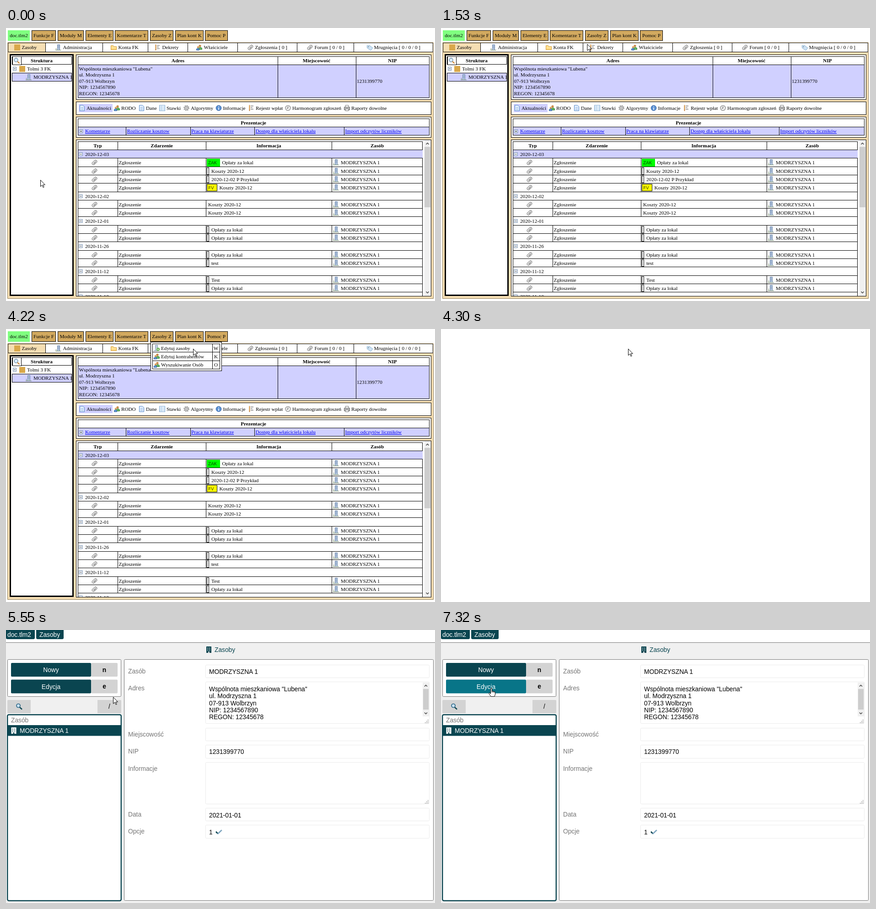
An HTML page for the animation above (8 s loop, 938 by 597 pixels).

```html
<!DOCTYPE html>
<html lang="pl">
<head>
<meta charset="utf-8">
<title>Zasoby</title>
<style>
html, body { margin: 0; width: 100%; height: 100%; overflow: hidden; background: #fff; }
svg { display: block; }
text { white-space: pre; }
#old { font: 11.2px "Liberation Serif", "Times New Roman", serif; }
#form { font: 13.75px "Liberation Sans", Arial, sans-serif; }
</style>
</head>
<body>
<svg id="stage" width="938" height="597" viewBox="0 0 938 597">
  <g id="old"></g>
  <g id="form"></g>
  <path id="arrow" fill="#fff" stroke="#000" d="M.5.5v14.2l3.3-3.1 2.4 5.2 2-.9-2.3-5h4.5z"/>
  <g id="hand" stroke="#000" stroke-linejoin="round">
    <path fill="#fff" d="M-1.3 1.3a1.3 1.3 0 0 1 2.6 0v6q1.4-1.2 2.7.3 1.3-.8 2.3.5 2-.6 2.2 1.4v4.5l-1.6 4.5h-7.6l-4-5.5q-1.3-2.2.2-2.6 1.3-.2 3 2z"/>
    <path fill="none" stroke-width=".8" d="M1.3 7v3M4 7.6v2.6M6.4 8.2v2.2"/>
  </g>
</svg>
<script>
const $ = id => document.getElementById(id);
const LOOP = 8000, LILAC = '#d0d0ff', WHEAT = '#f5deb3', TEAL = '#0a4550', HOVER = '#087588';
const USER = 'doc.tlm2', PLACE = 'MODRZYSZNA 1', TAX = '1231399770';
const ADDRESS = ['Wspólnota mieszkaniowa "Lubena"', 'ul. Modrzyszna 1', '07-913 Wolbrzyn',
  'NIP: 1234567890', 'REGON: 12345678'];

// drawing helpers
const fill = (x, y, w, h, c, more = '') => `<rect x="${x}" y="${y}" width="${w}" height="${h}" fill="${c}" ${more}/>`;
const box = (x, y, x2, y2, c = '#fff', line = '#000', more = '') =>
  fill(x + .5, y + .5, x2 - x - 1, y2 - y - 1, c, `stroke="${line}" ${more}`);
const path = (d, line = '#000', w = 1, c = 'none') => `<path d="${d}" fill="${c}" stroke="${line}" stroke-width="${w}"/>`;
const hline = (x, x2, y) => path(`M${x} ${Math.floor(y) + .5}H${x2}`);
const vline = (x, y, y2) => path(`M${x + .5} ${y}V${y2}`);
const text = (x, y, s, more = '') => `<text x="${x}" y="${y}" ${more}>${s}</text>`;
const mid = 'text-anchor="middle"';
const bold = mid + ' font-weight="bold"';
const chevron = (x, y, dir) => path(`M${x - 3} ${y + 1.5 * dir}l3 ${-3 * dir} 3 ${3 * dir}`, '#444', 1.5);

const glyphs = {
  square: fill(0, 0, 13, 13, '#d9a84a'),
  house: fill(4, 0, 6, 12, '#b9cbe2') + path('M4.5 12V.5h5V12M6 3h2M6 5.5h2M6 8h2', '#6580a8') + path('M1.5 12V8M0 12.5h13', '#78906e'),
  add: fill(3, 0, 6, 12, '#dde6ef') + path('M3.5 12V.5h5V12M5 3h2M5 5.5h2M0 12.5h9', '#7089a8') +
    '<circle cx="9.5" cy="9.5" r="3.5" fill="#55a83c"/>' + path('M7.5 9.5h4M9.5 7.5v4', '#fff'),
  folder: path('M.5 11.5v-9h5l1 2h6v7z', '#d49a32', 1, '#ffdc86') + path('M1 6h11', '#fff0bd'),
  people: '<circle cx="8" cy="3" r="2.6" fill="#c98b4c"/><circle cx="4" cy="6" r="2.3" fill="#dca05e"/>' +
    path('M5.5 11V8q3-4 7 0v3z', '#3a8a45', 1, '#65b35f') + path('M.5 12.5V10q3-4 6 0v2.5z', '#315f9f', 1, '#6297d2'),
  clip: '<g transform="rotate(-42 6.5 6.5)" fill="none" stroke="#858585"><rect x=".5" y="3.5" width="12" height="6" rx="2.5" fill="#eee"/><path d="M3 6.5h8M3 8h6"/></g>',
  tag: '<g transform="rotate(35 6.5 6.5)"><path d="M0 6.5 3 3h10v7H3z" fill="#cfe3f4" stroke="#92b8d6"/><circle cx="4" cy="6.5" r="1" fill="#567"/></g>',
  doc: path('M1.5.5h7l3 3v9h-10z', '#4d83c7', 1, '#e9f2ff') + path('M3.5 5h6M3.5 7.5h6M3.5 10h6', '#92b6e1'),
  grid: fill(.5, .5, 12, 12, '#edf6ff', 'stroke="#7da6cf"') + path('M1 4h11M1 7h11M1 10h11M4.5 1v11', '#b2cfe8'),
  list: path('M2.5 0v13', '#c07b35', 2) + path('M5 2h6M5 5.5h4M5 9h6', '#555') + path('M1 2h3M1 5h3M1 8h3', '#f1c77c'),
  gear: '<circle cx="6.5" cy="6.5" r="4" fill="#ddd" stroke="#888"/><circle cx="6.5" cy="6.5" r="5.3" fill="none" stroke="#888" stroke-width="2" stroke-dasharray="2 2.15"/><circle cx="6.5" cy="6.5" r="1.6" fill="#fff" stroke="#888"/>',
  info: '<circle cx="6.5" cy="6.5" r="5.8" fill="#5c91d3" stroke="#3464a5"/>' + path('M6.5 5.5v5M6.5 2.5v1.6', '#fff', 1.6),
  clock: '<circle cx="6.5" cy="6.5" r="5.5" fill="#eee" stroke="#999" stroke-width="1.5"/>' + path('M6.5 3v4H4', '#555'),
  printer: path('M3 5V.5h7V5', '#777', 1, '#fff') + path('M.5 4.5h12v6H.5z', '#666', 1, '#bbb') + path('M3 8.5h7v4H3z', '#666', 1, '#fff'),
  lens: '<circle cx="5" cy="5" r="4" fill="#dceeff" stroke="#6f8fab" stroke-width="1.4"/>' + path('M8 8l4.5 4.5', '#c98232', 2.2),
  fold: fill(.5, .5, 7, 7, '#fff', 'stroke="#6c87aa"') + path('M2 4h4', '#234'),
  unfold: fill(.5, .5, 7, 7, '#fff', 'stroke="#6c87aa"') + path('M2 4h4M4 2v4', '#234')
};
const icon = (kind, x, y) => `<g transform="translate(${x} ${y})">${glyphs[kind]}</g>`;
const tower = (x, y, c, hole) => fill(x, y, 11, 14, c) +
  path(`M${x + 2.5} ${y + 3.2}h6M${x + 2.5} ${y + 6}h6M${x + 2.5} ${y + 8.8}h6`, hole, 1.6) .replace('/>', ' stroke-dasharray="1.7 2.4"/>') +
  fill(x + 4.3, y + 11, 2.4, 3, hole);

function menuBar() {
  const items = [['Funkcje F', 56, 109], ['Moduły M', 113, 170], ['Elementy E', 174, 235], ['Komentarze T', 238, 311],
    ['Zasoby Z', 315, 366], ['Plan kont K', 370, 432], ['Pomoc P', 435, 485]];
  return fill(4, 5, 48, 23, '#80ff80') + text(28, 20, USER, mid) +
    items.map(([s, a, b]) => box(a, 5, b, 28, '#d2a95f') + text((a + b) / 2, 20, s, mid)).join('');
}

function tabs() {
  const items = [['Zasoby', 4, 'square', 18], ['Administracja', 86, 'house', 108], ['Konta FK', 211, 'folder', 229],
    ['Dekrety', 310, 'list', 325], ['Właściciele', 397, 'people', 416], ['Zgłoszenia [ 0 ]', 506, 'clip', 528],
    ['Forum [ 0 / 0 ]', 636, 'clip', 658], ['Mrugnięcia [ 0 / 0 / 0 ]', 760, 'tag', 788]];
  return items.map(([s, x, kind, ix], i) =>
    box(x, 32, (items[i + 1] || [0, 933])[1] + 1, 53, i ? '#fff' : WHEAT) + icon(kind, ix, 36) + text(ix + 16.5, 46, s)).join('');
}

function tree() {
  return fill(9.5, 58.5, 137, 526, '#fff', 'stroke="#000" stroke-width="3"') +
    box(13, 62, 144, 80) + text(78, 74.5, 'Struktura', bold) + box(14, 62, 34, 81) + icon('lens', 17, 65) +
    icon('fold', 15, 85) + icon('square', 29, 83) + text(46, 93, 'Tolmi 3 FK') +
    box(13, 98, 144, 117, LILAC) + icon('house', 43, 101) + text(60, 111, PLACE);
}

function addressPanel() {
  return box(153, 58, 930, 157) + box(157, 62, 926, 153) + fill(158, 81, 767, 71, LILAC) + hline(157, 926, 80) +
    vline(594, 62, 153) + vline(765, 62, 153) +
    text(376, 74.5, 'Adres', bold) + text(679, 74.5, 'Miejscowość', bold) + text(845, 74.5, 'NIP', bold) +
    ADDRESS.map((s, i) => text(159.5, 92.5 + 13.5 * i, s)).join('') + text(767, 119.5, TAX);
}

function toolBar() {
  const items = [['Aktualności', 160, 'doc'], ['RODO', 236, 'people'], ['Dane', 290, 'doc'], ['Stawki', 335, 'grid'],
    ['Algorytmy', 388, 'gear'], ['Informacje', 458.5, 'info'], ['Rejestr wpłat', 530, 'list'],
    ['Harmonogram zgłoszeń', 610, 'clock'], ['Raporty dowolne', 739, 'printer']];
  return box(153, 161, 930, 190) + fill(159, 166, 74, 18, LILAC) +
    items.map(([s, x, kind]) => icon(kind, x, 168.5) + text(x + 16, 179, s)).join('');
}

function links() {
  const items = [['Komentarze', 173], ['Rozliczanie kosztow', 264.5], ['Praca na klawiaturze', 405],
    ['Dostęp dla właściciela lokalu', 545.5], ['Import odczytów liczników', 741.5]];
  return box(153, 194, 930, 240) + box(157, 198, 926, 235) + fill(158, 217, 767, 17, LILAC) + hline(157, 926, 216) +
    text(541, 210.5, 'Prezentacje', bold) + icon('unfold', 160, 222) +
    items.map(([s, x], i) => (i ? vline(Math.floor(x - 2), 216, 235) : '') +
      text(x, 229, s, 'fill="#00e" text-decoration="underline"')).join('');
}

// '#' starts a date row, '|' a narrow marker, 'ZAK' and 'FV' a coloured badge
const EVENTS = ['#2020-12-03', 'ZAK Opłaty za lokal', '|Koszty 2020-12', '|2020-12-02 P Przykład', 'FV Koszty 2020-12',
  '#2020-12-02', 'Koszty 2020-12', 'Koszty 2020-12', '#2020-12-01', '|Opłaty za lokal', '|Opłaty za lokal',
  '#2020-11-26', '|Opłaty za lokal', '|test', '#2020-11-12', '|Test', '|Opłaty za lokal', '#2020-11-10'];

function info(s, y) {
  const mono = 'font-family="Liberation Mono, monospace" font-size="10.5"';
  if (s[0] == '|') return box(439, y - 8, 444, y + 8) + text(449, y + 4, s.slice(1));
  if (s.startsWith('ZAK')) return fill(439, y - 8, 29, 17, '#0f0') + text(442, y + 3.5, 'ZAK', mono + ' fill="#064d06"') + text(472.5, y + 4, s.slice(4));
  if (s.startsWith('FV')) return box(439, y - 8, 462, y + 8, '#ff0') + text(442, y + 3.5, 'FV', mono + ' fill="#444400"') + text(466.5, y + 4, s.slice(3));
  return text(442, y + 4, s);
}

function eventRow(s, i) {
  const y = Math.round(276 + 18.3 * i), top = Math.floor(266.5 + 18.3 * i), end = Math.floor(284.8 + 18.3 * i);
  const line = hline(157, 911, end);
  if (s[0] == '#')
    return (i ? '' : fill(158, top + 1, 753, end - top - 1, LILAC)) + icon('fold', 159.5, y - 4) + text(173, y + 4, s.slice(1)) + line;
  return [244, 437, 712].map(x => vline(x, top, end)).join('') + icon('clip', 187, y - 6.5) +
    text(246.5, y + 4, 'Zgłoszenie') + info(s, y) + icon('house', 715, y - 7) + text(732, y + 4, PLACE) + line;
}

function events() {
  const heads = [['Typ', 200.5], ['Zdarzenie', 340.5], ['Informacja', 574.5], ['Zasób', 811.5]];
  return '<clipPath id="cut"><rect x="153" y="244" width="777" height="342"/></clipPath>' +
    box(153, 244, 930, 587) + '<g clip-path="url(#cut)">' + box(157, 248, 911, 620) +
    heads.map(([s, x]) => text(x, 261, s, bold)).join('') +
    [244, 437, 712].map(x => vline(x, 248, 266)).join('') + hline(157, 911, 266) +
    EVENTS.map(eventRow).join('') + '</g>' +
    fill(915, 245, 14, 341, '#f0f0f0') + fill(915, 260, 13, 132, '#cdcdcd') + chevron(921.5, 253, 1) + chevron(921.5, 578, -1);
}

function dropDown() {
  const items = [['Edytuj zasoby', 'W', 'add'], ['Edytuj kontrahentów', 'K', 'people'], ['Wyszukiwanie Osób', 'O', 'people']];
  return '<g id="menu">' + box(316, 28, 472, 92) + box(320, 32, 468, 88) + vline(451, 32, 88) +
    items.map(([s, key, kind], i) => {
      const y = 41.5 + 18.3 * i;
      return icon(kind, 323, y - 6.5) + text(339, y + 4, s) + text(459, y + 4, key, mid) + (i ? hline(320, 468, y - 9) : '');
    }).join('') + '</g>';
}

function formPage() {
  const white = 'fill="#fff"', grey = 'fill="#757575"', tealText = `fill="${TEAL}"`;
  const fields = [['Zasób', 76, 105], ['Adres', 113, 205], ['Miejscowość', 214, 243], ['NIP', 251, 281],
    ['Informacje', 289, 381], ['Data', 389, 418], ['Opcje', 426, 456]];
  const key = (y, name, k, id) => fill(11, y, 175, 30, TEAL, `id="${id}" rx="2"`) + fill(186, y, 58, 30, '#d3d3d3', 'rx="2"') +
    text(98.5, y + 20, name, mid + ' ' + white) + text(215, y + 19.5, k, bold);
  const grip = y => [[0, 6], [3, 6], [6, 6], [3, 3], [6, 3], [6, 0]].map(([a, b]) => fill(916 + a, y + b, 1.4, 1.4, '#777')).join('');
  return fill(0, 0, 938, 597, '#f0f0f0') + fill(0, 0, 938, 27, '#fff') + path('M0 27.5H938', '#777') +
    fill(0, -4, 63, 24, TEAL, 'rx="3"') + fill(66, -4, 60, 24, TEAL, 'rx="3"') +
    text(3, 14.5, USER, white) + text(73, 14.5, 'Zasoby', white) +
    tower(438, 36, TEAL, '#f0f0f0') + text(456, 48, 'Zasoby', tealText) +
    box(3, 64, 252, 146, '#fff', '#777', 'rx="2"') + key(72, 'Nowy', 'n', 'add') + key(108.5, 'Edycja', 'e', 'edit') +
    fill(3, 153, 249, 29, '#d3d3d3', 'rx="2"') + fill(54, 153, 146, 29, '#f0f0f0') +
    '<circle cx="27" cy="165.5" r="4" fill="#c9e2f4" stroke="#2d6786" stroke-width="1.7"/>' + path('M30 169l5 4.5', TEAL, 2.4) +
    text(226, 172, '/', mid) +
    fill(3.2, 185.2, 248.6, 406.8, '#fff', `stroke="${TEAL}" stroke-width="2.4" rx="3"`) +
    text(11, 202, 'Zasób', grey) + fill(4, 208, 247, 23.5, TEAL) + tower(11.5, 213, '#fff', TEAL) + text(30, 225, PLACE, white) +
    box(258, 64, 935, 592, '#fff', '#777', 'rx="2"') +
    fields.map(([s, a, b]) => text(267, a + 19, s, grey) + box(436, a, 926, b, '#fff', '#ebebeb', 'rx="2"')).join('') +
    text(444, 96, PLACE) + ADDRESS.map((s, i) => text(444, 134 + 15.35 * i, s)).join('') +
    text(444, 270.5, TAX) + text(444, 409.5, '2021-01-01') + text(444, 447, '1') +
    path('M459 441l4.5 4.5', TEAL, 2.8) + path('M462.7 446l9-8.5', '#7fa6c0', 2.8) +
    fill(911, 115, 14, 74, '#f0f0f0') + fill(912, 129, 12, 45, '#cdcdcd') + chevron(918, 122, 1) + chevron(918, 182, -1) +
    grip(196) + grip(372);
}

$('old').innerHTML = fill(3, 31, 932, 561, WHEAT) + path('M3.5 53V591.5H934.5V53', '#8c7a55') +
  menuBar() + tabs() + tree() + addressPanel() + toolBar() + links() + events() + dropDown();
$('form').innerHTML = formPage();

// pointer moves: first and last change, number of changes, eased or not, evenly timed points
const MOVES = [
  [530, 1300, 11, 1, [[75, 332], [311, 48]]],
  [1380, 2070, 10, 0, [[311, 48], [325, 26], [331, 11], [332, 22]]],
  [2680, 3450, 11, 1, [[332, 22], [406, 42]]],
  [3530, 3600, 2, 0, [[406, 42], [409, 43]]],
  [5170, 5930, 11, 1, [[409, 43], [101, 225]]],
  [6010, 6170, 3, 0, [[101, 225], [96, 215], [102, 220], [102, 225]]],
  [6470, 7240, 11, 0, [[102, 225], [148, 208], [188, 168], [158, 138], [108, 127]]],
  [7320, 7321, 1, 0, [[108, 127], [110, 127]]]
];

function pointer(t) {
  const [start, end, n, eased, pts] = MOVES.filter(m => t >= m[0]).pop() || MOVES[0];
  if (t < start) return pts[0];
  const step = n > 1 ? (end - start) / (n - 1) : 1;
  let u = Math.min(n, Math.floor((t - start) / step + .01) + 1) / n;
  if (eased) u = u * u * (3 - 2 * u);
  const p = u * (pts.length - 1), i = Math.min(pts.length - 2, Math.floor(p)), f = p - i;
  return [0, 1].map(k => pts[i][k] + (pts[i + 1][k] - pts[i][k]) * f);
}

const show = (el, on) => el.setAttribute('visibility', on ? 'inherit' : 'hidden');

function render(t) {
  const [x, y] = pointer(t), onForm = t >= 4540;
  const inside = (a, b, c, d) => x >= a && x <= c && y >= b && y <= d;
  const onEdit = onForm && inside(11, 108, 186, 139);
  const hand = onForm
    ? t < 5170 || inside(4, 208, 251, 232) || inside(11, 108, 244, 139) || inside(11, 72, 244, 102)
    : t < 4300 && inside(315, 5, 366, 27);
  show($('old'), t < 4300);
  show($('menu'), t >= 1610 && t < 4300);
  show($('form'), onForm);
  $('edit').setAttribute('fill', onEdit ? HOVER : TEAL);
  show($('hand'), hand);
  show($('arrow'), !hand);
  for (const id of ['hand', 'arrow']) $(id).setAttribute('transform', `translate(${x} ${y})`);
}

function tick() {
  render(performance.now() % LOOP);
  requestAnimationFrame(tick);
}
tick();
</script>
</body>
</html>
```
